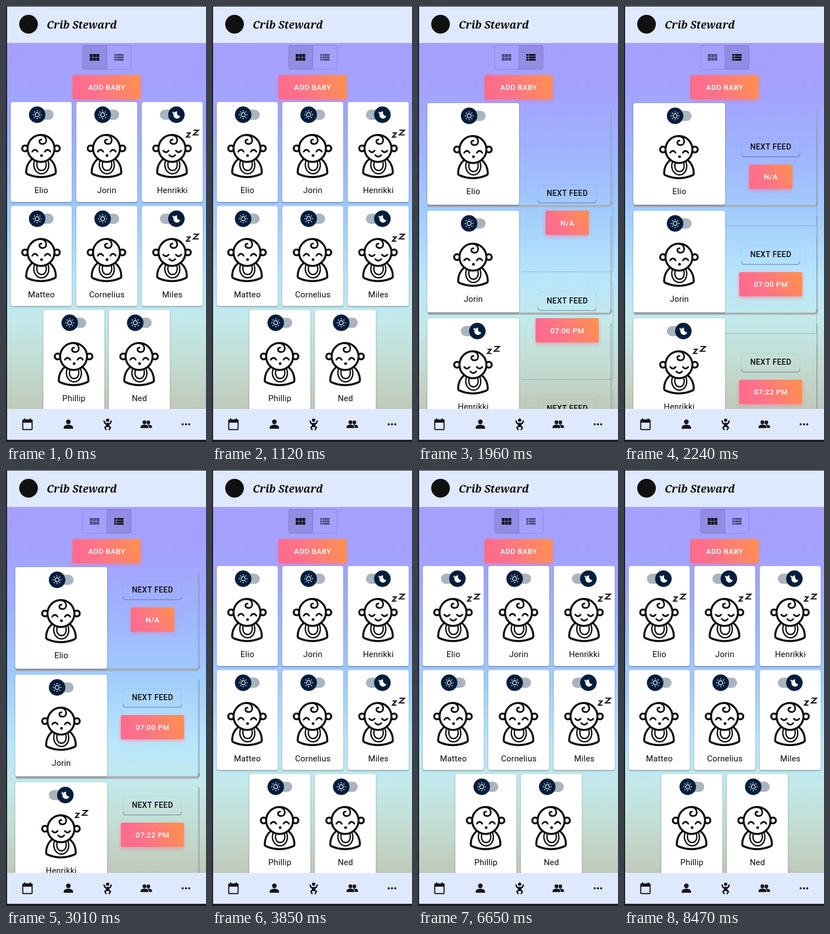
Recreate the animation shown at these times as an HTML page with a canvas. Size 364x790 px, loop 8.75 s.

```html
<!DOCTYPE html>
<html lang="en">
<head>
<meta charset="utf-8">
<title>Crib Steward</title>
<style>
  html, body { margin: 0; width: 100%; height: 100%; overflow: hidden; background: #1b1d2a; }
  canvas { display: block; width: 364px; height: 790px; }
</style>
</head>
<body>
<canvas id="stage" width="364" height="790"></canvas>
<script>
const W = 364, H = 790, LOOP = 8750;
const canvas = document.getElementById('stage');
const ctx = canvas.getContext('2d');
const dpr = window.devicePixelRatio || 1;
canvas.width = W * dpr;
canvas.height = H * dpr;

const INK = '#0a0a0a', BAR = '#dfe9fd', NAVY = '#001e3c';
const UI = 'Roboto, "Open Sans", sans-serif';
const TO_LIST = 1540, TO_GRID = 3710;

const babies = [
  { name: 'Elio', feed: 'N/A', sleepAt: 5320 },
  { name: 'Jorin', feed: '07:00 PM', sleepAt: 7910 },
  { name: 'Henrikki', feed: '07:22 PM', sleepAt: -1000 },
  { name: 'Matteo' },
  { name: 'Cornelius' },
  { name: 'Miles', sleepAt: -1000 },
  { name: 'Phillip' },
  { name: 'Ned' }
];

const art = {
  body: new Path2D('M-16 19C-23 25-27 34-27 43Q-27 46-24 47Q0 57 24 47Q27 46 27 43C27 34 23 25 16 19'),
  bib: new Path2D('M-12 23C-16 36-8 46 1 46C10 46 17 36 13 23M-7 25C-9 34-5 40 1 40C7 40 11 34 9 25'),
  curl: new Path2D('M0-24C11-24 13-8 3-8C-4-8-5-16 1-16'),
  awake: new Path2D('M-16 6Q-11-1-6 6M7 6Q12-1 17 6'),
  asleep: new Path2D('M-16 4Q-11 10-6 4M7 4Q12 10 17 4M-5 12Q0.5 18 6 12'),
  zz: new Path2D('M26.5-28h6.5l-6.5 7.5h7M39-33h9l-9 8.5h9.5'),
  moon: new Path2D('M1.5-6A6.5 6.5 0 1 0 7.2 2.6A6.2 6.2 0 0 1 1.5-6Z'),
  star: new Path2D('M-5.5-6.5l.8 1.9l1.9.8l-1.9.8l-.8 1.9l-.8-1.9l-1.9-.8l1.9-.8Z'),
  person: new Path2D('M-8.5 8V5.5C-8.5 2-3 .7 0 .7S8.5 2 8.5 5.5V8Z'),
  limbs: new Path2D('M-6.5-6L-5-2.2Q0 .5 5-2.2L6.5-6M-2.5 4L-5 5.5L-3 9.5M2.5 4L5 5.5L3 9.5')
};

const clamp = v => v < 0 ? 0 : v > 1 ? 1 : v;

function easeInOut(p) {
  let lo = 0, hi = 1, s = p;
  for (let i = 0; i < 20; i++) {
    const x = 3 * (1 - s) * s * (0.42 * (1 - s) + 0.58 * s) + s ** 3;
    if (x < p) lo = s; else hi = s;
    s = (lo + hi) / 2;
  }
  return s * s * (3 - 2 * s);
}

function at(x, y, draw) {
  ctx.save();
  ctx.translate(x, y);
  draw();
  ctx.restore();
}

function box(x, y, w, h, r, fill) {
  ctx.beginPath();
  ctx.roundRect(x, y, w, h, r);
  ctx.fillStyle = fill;
  ctx.fill();
}

function disc(x, y, r, fill) {
  ctx.beginPath();
  ctx.arc(x, y, r, 0, Math.PI * 2);
  ctx.fillStyle = fill;
  ctx.fill();
}

function ring(x, y, r) {
  ctx.beginPath();
  ctx.arc(x, y, r, 0, Math.PI * 2);
  ctx.stroke();
}

function pen(width, colour = INK) {
  ctx.lineWidth = width;
  ctx.strokeStyle = colour;
  ctx.lineCap = ctx.lineJoin = 'round';
}

function label(text, x, y, font, fill, spacing = 0, align = 'center') {
  ctx.font = font;
  ctx.letterSpacing = spacing + 'px';
  ctx.textAlign = align;
  ctx.textBaseline = 'alphabetic';
  ctx.fillStyle = fill;
  ctx.fillText(text, x + (align === 'center' ? spacing / 2 : 0), y);
}

function withShadow(colour, blur, dy, draw) {
  ctx.save();
  ctx.shadowColor = colour;
  ctx.shadowBlur = blur * dpr;
  ctx.shadowOffsetY = dy * dpr;
  draw();
  ctx.restore();
}

function background() {
  ctx.fillStyle = '#1b1d2a';
  ctx.fillRect(0, 0, W, H);
  const g = ctx.createLinearGradient(0, 67, 0, 730);
  [[0, '#a59ffc'], [0.13, '#a3a2fd'], [0.3, '#9fb4fe'], [0.47, '#a2cdfc'],
   [0.64, '#b9e6fc'], [0.76, '#c3e9ea'], [0.88, '#c3dcd2'], [1, '#bfc9b9']]
    .forEach(([p, c]) => g.addColorStop(p, c));
  ctx.fillStyle = g;
  ctx.fillRect(2, 60, W - 2, 680);
}

function header() {
  ctx.fillStyle = BAR;
  ctx.fillRect(2, 1, W - 2, 66);
  disc(41, 33, 17, '#111');
  label('Crib Steward', 74, 41, 'italic bold 19px "Noto Serif", serif', INK, 0, 'left');
}

function viewSwitch(list) {
  const shade = 'rgba(30,25,70,.14)';
  box(list ? 183.5 : 139.5, 71, 44.5, 44, list ? [0, 4, 4, 0] : [4, 0, 0, 4], shade);
  ctx.beginPath();
  ctx.roundRect(139.5, 71.5, 88, 43, 4);
  ctx.moveTo(183.5, 71.5);
  ctx.lineTo(183.5, 114.5);
  pen(1, 'rgba(30,25,70,.16)');
  ctx.stroke();
  const on = '#101018', off = 'rgba(20,20,45,.6)';
  ctx.fillStyle = list ? off : on;
  for (let i = 0; i < 6; i++) {
    ctx.fillRect(152.5 + i % 3 * 6, 87 + Math.floor(i / 3) * 6.5, 5.2, 5.6);
  }
  ctx.fillStyle = list ? on : off;
  for (let i = 0; i < 3; i++) {
    ctx.fillRect(197, 87 + i * 4.4, 3.6, 3.3);
    ctx.fillRect(201.6, 87 + i * 4.4, 12.4, 3.3);
  }
}

function pinkButton(text, cx, y, w, h = 44) {
  const x = cx - w / 2;
  const g = ctx.createLinearGradient(x + w * 0.1, y + h, x + w * 0.9, y);
  g.addColorStop(0, '#fe6b8b');
  g.addColorStop(0.3, '#fe718a');
  g.addColorStop(1, '#ff8e53');
  withShadow('rgba(255,105,135,.5)', 7, 3, () => box(x, y, w, h, 3, g));
  label(text, cx, y + h / 2 + 4.8, '500 13.6px ' + UI, '#fff', 0.4);
}

function sleepSwitch(cx, cy, on) {
  box(cx - 22.5, cy - 9.3, 45, 18.6, 9.3, '#aab4be');
  at(cx - 7.5 + 15 * on, cy, () => {
    disc(0, 0, 15, NAVY);
    if (on > 0.5) {
      ctx.fillStyle = '#fff';
      ctx.fill(art.moon);
      ctx.fill(art.star);
      return;
    }
    pen(1.4, '#fff');
    ring(0, 0, 3.7);
    for (let i = 0; i < 8; i++) {
      const a = i * Math.PI / 4;
      disc(Math.cos(a) * 7, Math.sin(a) * 7, 0.95, '#fff');
    }
  });
}

function babyFace(x, y, asleep) {
  at(x, y, () => {
    pen(3.6);
    ctx.stroke(art.body);
    ring(-29, 0, 5.2);
    ring(29, 0, 5.2);
    disc(0, 0, 24.5, '#fff');
    ring(0, 0, 24.5);
    pen(3);
    ctx.stroke(art.curl);
    pen(2.4);
    ctx.stroke(art.bib);
    pen(2.8);
    ctx.stroke(asleep ? art.asleep : art.awake);
    if (asleep) {
      pen(2.2);
      ctx.lineCap = 'butt';
      ctx.lineJoin = 'miter';
      ctx.stroke(art.zz);
    } else {
      disc(1, 13, 2.5, INK);
    }
  });
}

function babyCard(baby, x, y, w, h, t) {
  withShadow('rgba(0,0,0,.32)', 3, 1.5, () => box(x, y, w, h, 4, '#fff'));
  const cx = x + w / 2;
  const since = baby.sleepAt === undefined ? -1 : t - baby.sleepAt;
  sleepSwitch(cx, y + 23, easeInOut(clamp(since / 150)));
  babyFace(cx - 0.5, y + 84, since >= 70);
  label(baby.name, cx, y + 165, '15px ' + UI, INK, 0.2);
}

function gridView(t) {
  babies.forEach((baby, i) => {
    const row = Math.floor(i / 3);
    const x = (row === 2 ? 68 : 8.7) + i % 3 * 119.2;
    babyCard(baby, x, 174 + row * 188.5, 111, 181, t);
  });
}

function rowEdge(y) {
  ctx.beginPath();
  ctx.moveTo(20, y + 186.5);
  ctx.lineTo(346, y + 186.5);
  ctx.quadraticCurveTo(351.5, y + 186.5, 351.5, y + 180);
  pen(4, '#a9b0b6');
  ctx.stroke();
  ctx.beginPath();
  ctx.moveTo(351.5, y + 10);
  ctx.lineTo(351.5, y + 182);
  pen(2, 'rgba(150,160,178,.75)');
  ctx.stroke();
}

function feedPanel(baby, y) {
  ctx.beginPath();
  ctx.moveTo(184, y + 184);
  ctx.lineTo(350, y + 184);
  ctx.lineTo(350, y + 8);
  pen(1, 'rgba(120,130,165,.5)');
  ctx.stroke();

  // only the lower rim of this flat button casts a shade
  ctx.beginPath();
  ctx.moveTo(213.5, y + 54);
  ctx.quadraticCurveTo(213.5, y + 59, 218, y + 59);
  ctx.lineTo(315, y + 59);
  ctx.quadraticCurveTo(319.5, y + 59, 319.5, y + 54);
  pen(1.6, 'rgba(70,85,115,.42)');
  ctx.stroke();
  ctx.beginPath();
  ctx.roundRect(213.5, y + 25.5, 106, 33, 4);
  pen(1, 'rgba(90,105,150,.12)');
  ctx.stroke();
  label('NEXT FEED', 266.5, y + 46, '500 14px ' + UI, INK, 0.4);
  pinkButton(baby.feed, 266.5, y + 73, baby.feed.length > 3 ? 115 : 79);
}

function listView(t) {
  const rows = babies.slice(0, 3);
  const left = 1 - easeInOut(clamp((t - TO_LIST) / 1020));
  rows.forEach((baby, i) => {
    const y = 176 + i * 195;
    rowEdge(y);
    babyCard(baby, 17, y, 167, 184, t);
  });
  at(12 * left * left, 188 * left, () =>
    rows.forEach((baby, i) => feedPanel(baby, 176 + i * 195)));
}

function person(x, y, scale = 1) {
  at(x, y, () => {
    ctx.scale(scale, scale);
    disc(0, -4.5, 4.2, '#15161c');
    ctx.fill(art.person);
  });
}

function navBar() {
  ctx.fillStyle = BAR;
  ctx.fillRect(2, 730, W - 2, 56);
  ctx.fillStyle = '#1b1d2a';
  ctx.fillRect(0, 786, W, 4);
  const dark = '#15161c';
  pen(2, dark);
  ctx.lineJoin = 'miter';
  ctx.beginPath();
  ctx.roundRect(30.5, 750, 17, 17.5, 1);
  ctx.stroke();
  ctx.fillStyle = dark;
  ctx.fillRect(30, 750, 18, 5);
  ctx.fillRect(33, 747, 2, 4);
  ctx.fillRect(43, 747, 2, 4);

  person(113.5, 758);

  at(185, 758, () => {
    disc(0, -7.5, 3, dark);
    box(-3.4, -2.5, 6.8, 7.5, 2, dark);
    pen(2.6, dark);
    ctx.stroke(art.limbs);
  });

  person(259, 758, 0.8);
  ctx.save();
  pen(2.2, BAR);
  at(252, 758, () => {
    ctx.scale(0.84, 0.84);
    ctx.stroke(art.person);
    ring(0, -4.5, 4.2);
  });
  ctx.restore();
  person(252, 758, 0.84);
  [321.5, 327.5, 333.5].forEach(x => disc(x, 758, 1.9, dark));
}

function draw(t) {
  const list = t >= TO_LIST && t < TO_GRID;
  ctx.setTransform(dpr, 0, 0, dpr, 0, 0);
  background();
  viewSwitch(list);
  pinkButton('ADD BABY', 183, 125, 124);
  if (list) listView(t); else gridView(t);
  header();
  navBar();
}

const start = performance.now();
function tick() {
  draw((performance.now() - start) % LOOP);
  requestAnimationFrame(tick);
}
tick();
</script>
</body>
</html>
```
